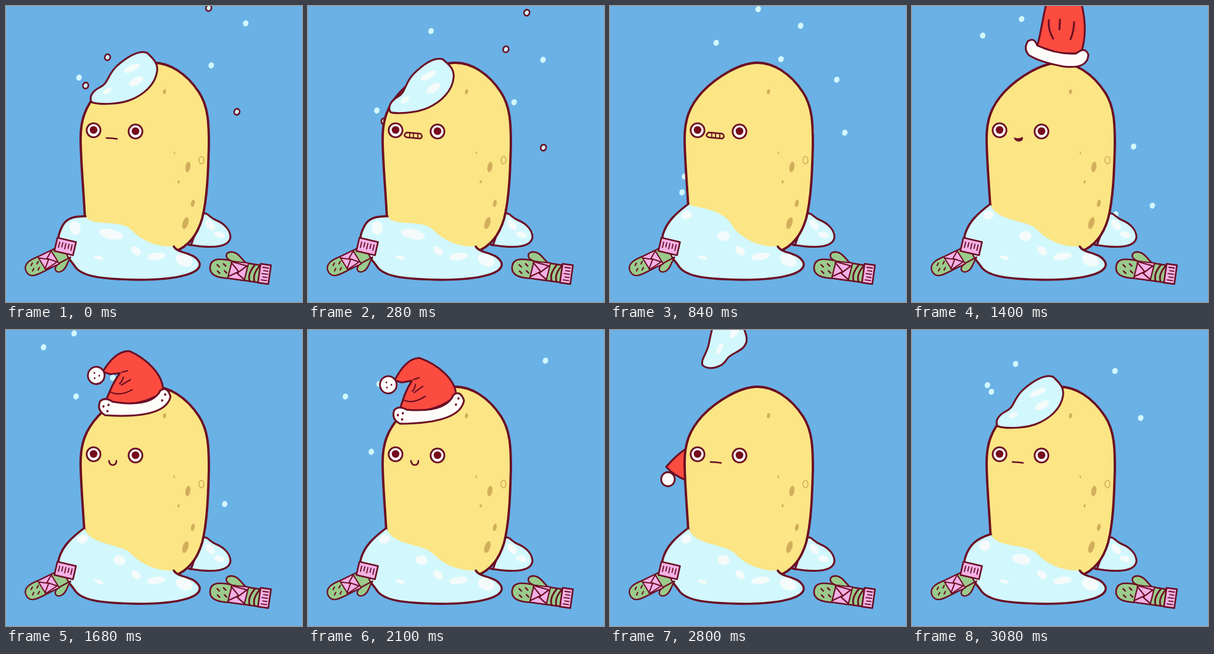
Animation of 480 by 480 pixels, one loop 3.22 s. Source, as an HTML page with a canvas:

```html
<!DOCTYPE html>
<html lang="en">
<head>
<meta charset="utf-8">
<title>Snowy potato</title>
<style>
html, body { margin: 0; width: 100%; height: 100%; overflow: hidden; background: #6ab1e6; }
canvas { display: block; width: 480px; height: 480px; }
</style>
</head>
<body>
<canvas id="stage" width="480" height="480"></canvas>
<script>
const ctx = document.getElementById('stage').getContext('2d');
const STEP = 140, STEPS = 23;
const SKY = '#6ab1e6', INK = '#6b0e24', SNOW = '#d2f8fd', SHINE = '#f4fbfa', SKIN = '#fbe584', SPOT = '#d2ae5c';
const RED = '#fc4c40', PINK = '#f3b1e6', GREEN = '#9acb8c', WHITE = '#fdfcfb';

const ramp = (k, from, to) => Math.max(0, Math.min(1, (k - from) / (to - from)));
const random = seed => {
  const v = Math.sin(seed * 12.9898) * 43758.5453;
  return v - Math.floor(v);
};

function paint(path, fill, ink, width) {
  if (fill) { ctx.fillStyle = fill; ctx.fill(path); }
  if (ink) { ctx.strokeStyle = ink; ctx.lineWidth = width; ctx.stroke(path); }
}
const shape = (d, fill, width = 3) => paint(new Path2D(d + 'Z'), fill, INK, width);
const line = (d, width = 2.2) => paint(new Path2D(d), null, INK, width);
function oval(x, y, rx, ry, deg, fill, ink, width) {
  const path = new Path2D();
  path.ellipse(x, y, rx, ry, deg * Math.PI / 180, 0, 7);
  paint(path, fill, ink, width);
}
function placed(x, y, deg, draw, sx = 1, sy = sx) {
  ctx.save();
  ctx.translate(x, y);
  ctx.rotate(deg * Math.PI / 180);
  ctx.scale(sx, sy);
  draw();
  ctx.restore();
}
// Shift a drawing and turn it around the middle of the head's top
const nudged = (x, y, deg, draw) =>
  placed(x + 190, y + 115, deg, () => placed(-190, -115, 0, draw));

// A flurry bursts in at the end of the loop, then steady snow until the hat slips
function snowfall(k) {
  const since = (k + 3) % STEPS;
  if (since > 21) return;
  for (let i = 0; i < 26; i++) {
    const age = since - 1.2 - Math.max(0, i - 7) * .85;
    const start = i < 8 ? 150 * random(i + 40) : 0;
    const y = start + age * (26 + 8 * random(i + 80));
    if (age < 0 || y > 345) continue;
    const x = 65 + 320 * random(i + 5) + 7 * Math.sin(age * .6 + i);
    oval(x, y, 4.4, 5, 20, SNOW, k < 4 && i % 2 && INK, 2.6);
  }
}

function backSnow() {
  shape('M300 388L318 337C328 334 328 342 340 347C355 353 364 364 364 375C362 389 342 395 296 387', SNOW);
  oval(331, 355, 6, 10, -40, SHINE);
  oval(346, 371, 9, 5, 15, SHINE);
}

function potato() {
  shape('M128 345C126 300 121 250 121 215C121 185 128 163 150 139C172 116 210 92 239 92' +
    'C264 92 292 108 313 140C328 163 329 190 329 225C328 260 327 310 318 345C310 372 295 390 274 398L150 395', SKIN, 3.8);
  oval(257, 139, 2.5, 4, 10, SPOT);
  oval(295, 261, 4, 8.5, 10, SPOT);
  oval(273, 238, 1, 2.5, -25, SPOT);
  oval(280, 285, 1.8, 2.5, 0, SPOT);
  oval(303, 320, 3, 6, 12, SPOT);
  oval(291, 352, 4.5, 10, 18, SPOT);
  oval(317, 250, 4, 6, 0, null, SPOT, 1.6);
}

function face(k) {
  for (const [x, y] of [[142, 201.5], [210, 203.5]]) {
    oval(x, y, 11.2, 11.4, 0, WHITE, INK, 2.8);
    oval(x, y - .5, 6.2, 6.2, 0, '#760c1d');
  }
  if (k >= 2 && k < 8) {
    shape('M160 205L182 207Q188 211 182 215L160 213Q153 210 160 205', SKIN, 2.4);
    line('M165 206V213M171 207V214M178 207V214', 1.8);
  } else if (k === 10 || k === 11) shape('M166 214Q173 217 179 213Q180 219 173 219Q168 219 166 214', INK, 1.5);
  else if (k >= 12 && k < 18) line('M167 212Q168 219 173 219Q179 219 179 212', 2.6);
  else line('M163 214L172 214.5L180 215.5', 2.6);
}

// The pile grows when the clump lands in it, then settles
function pile(k) {
  const lift = ramp(k, 3, 6) - ramp(k, 21, 23);
  const bulge = 21 * Math.max(0, 1 - Math.abs(k - 6) / 4);
  const top = [129 - 2 * lift, 341 - 20 * lift];
  const edge = `M${top}C136 ${358 - 8 * lift - bulge} 186 ${346 - bulge} 202 362C222 382 245 391 272 390`;
  const rim = `C280 403 306 398 314 417C317 432 285 444 215 444C160 443 126 440 113 424` +
    `C98 402 80 390 86 370C92 350 ${100 + 6 * lift} ${340 - 3 * lift} ${top}`;
  paint(new Path2D(edge + rim), SNOW);
  line('M272 390' + rim, 3.4);
  oval(112 + 12 * lift, 360 - 21 * lift, 9, 11 - 4 * lift, -15, SHINE);
  oval(170 + 14 * lift, 370 + 3 * lift, 20 - 10 * lift, 8, 12, SHINE);
  oval(211, 397, 9, 6, 40, SHINE);
  oval(244, 406, 15, 6, -8, SHINE);
  oval(289, 412, 14, 10, 25, SHINE);
  oval(150, 408, 8, 3, 15, SHINE);
}

// Lies along the x axis from the fingertips; the thumb sticks up
function mitten(thumbShift) {
  shape('M1 0C1 -16 20 -14 34 -14L82 -13V15L35 15C14 17 1 14 1 0', GREEN, 2.6);
  placed(thumbShift, 0, 0, () => shape('M36 -13C20 -16 22 -28 34 -28C44 -28 50 -18 60 -12', GREEN, 2.6));
  shape('M35 -13L62 -14L59 15L32 15', PINK, 2.2);
  line('M34 -11L48 2L33 12M37 -12L60 -9L46 5L58 13');
  for (const [x, y] of [[12, -4], [22, -7], [14, 6], [25, 4]]) line(`M${x} ${y}l4 3`, 2.4);
}
function cuff(width, length) {
  shape(`M${-width / 2} ${-length / 2}h${width}v${length}h${-width}`, PINK, 2.6);
  for (let i = -2; i <= 2; i++) line(`M${i * width / 6} -5v${i % 2 ? 7 : 9}`, 1.8);
}
function mittens() {
  placed(32, 431, -26, () => mitten(26), .88, -.88);
  placed(96, 390, 13, () => cuff(31, 22));
  placed(330, 422, 8, () => {
    mitten(0);
    line('M73 -13Q62 4 68 15M81 -13Q70 4 76 15', 2.8);
    placed(90, 0, 90, () => cuff(31, 17));
  });
}

function clump() {
  shape('M139 156C134 148 140 138 152 132C166 126 164 112 180 97C195 84 215 71 229 76' +
    'C237 84 247 92 245 106C242 128 222 145 200 153C180 160 150 160 139 156', SNOW);
  oval(204, 101, 14, 5, -25, SHINE);
  oval(211, 122, 13, 6, -28, SHINE);
  oval(164, 138, 8, 4, -30, SHINE);
}
function fallingClump() {
  shape('M150 57C147 48 156 40 160 24C164 5 168 -30 192 -30C212 -20 224 8 221 20' +
    'C216 36 196 36 189 48C182 61 160 66 150 57', SNOW);
  oval(202, 3, 6, 11, 30, SHINE);
  oval(178, 30, 4, 10, 30, SHINE);
}

function fallingHat() {
  shape('M203 65C215 25 216 -45 250 -60C272 -30 290 30 274 77H240', RED);
  line('M222 23Q220 38 229 53M240 22L239 38M263 26Q262 43 257 54', 3);
  shape('M188 57Q198 50 203 64Q235 79 266 77Q281 65 286 79Q285 103 245 98Q208 91 190 80Q180 70 188 57', WHITE);
}
function pompom(x, y, r) {
  oval(x, y, r, r + .5, 0, WHITE, INK, 2.8);
}
function hat() {
  shape('M138 84C148 64 160 48 178 47C205 56 238 80 238 108Q200 140 147 131C152 115 156 100 166 84L150 87', RED);
  line('M154 116Q169 122 188 109M167 101Q171 97 172 90M170 103L184 93M169 82L178 79');
  shape('M138 132Q145 124 158 131Q222 136 234 106Q245 98 251 115Q245 152 148 154Q133 147 138 132', WHITE);
  for (const [x, y] of [[144, 140], [151, 147], [152, 137], [242, 112], [238, 122]]) oval(x, y, 1.8, 2, 0, INK);
  pompom(128, 91, 13.5);
  for (let a = 0; a < 6; a += 2) oval(128 + 5 * Math.cos(a), 91 + 5 * Math.sin(a), 1.3, 1.6, 0, INK);
}
function hatTip() {
  shape('M124 192Q107 203 91 222Q104 236 124 244', RED);
  pompom(94, 242, 11);
}

function scene(k) {
  const bounce = 2 ** (12 - k);
  const slip = 3.5 * Math.max(0, k - 15) ** 2;
  const slide = k % 22;

  ctx.fillStyle = SKY;
  ctx.fillRect(0, 0, 480, 480);
  snowfall(k);
  backSnow();
  if (k === 18) nudged(0, slip, 0, hat);
  if (k === 19 || k === 20) nudged(22 * (20 - k), 32 * (k - 20), 0, hatTip);
  potato();
  face(k);
  if (slide < 6) nudged(-4 * slide, 1.6 * slide ** 3, -2 * slide, clump);
  pile(k);
  mittens();
  if (k === 20 || k === 21) nudged(0, 62 * (k - 20), 0, fallingClump);
  if (k >= 9 && k < 12) nudged(10 * (10 - k), 40 * (k - 10), 0, fallingHat);
  if (k >= 12 && k < 18) nudged(16 * bounce, slip - 12 * bounce, 5 * bounce, hat);
}

ctx.lineJoin = ctx.lineCap = 'round';
function tick() {
  scene(Math.floor(performance.now() / STEP) % STEPS);
  requestAnimationFrame(tick);
}
tick();
</script>
</body>
</html>
```
